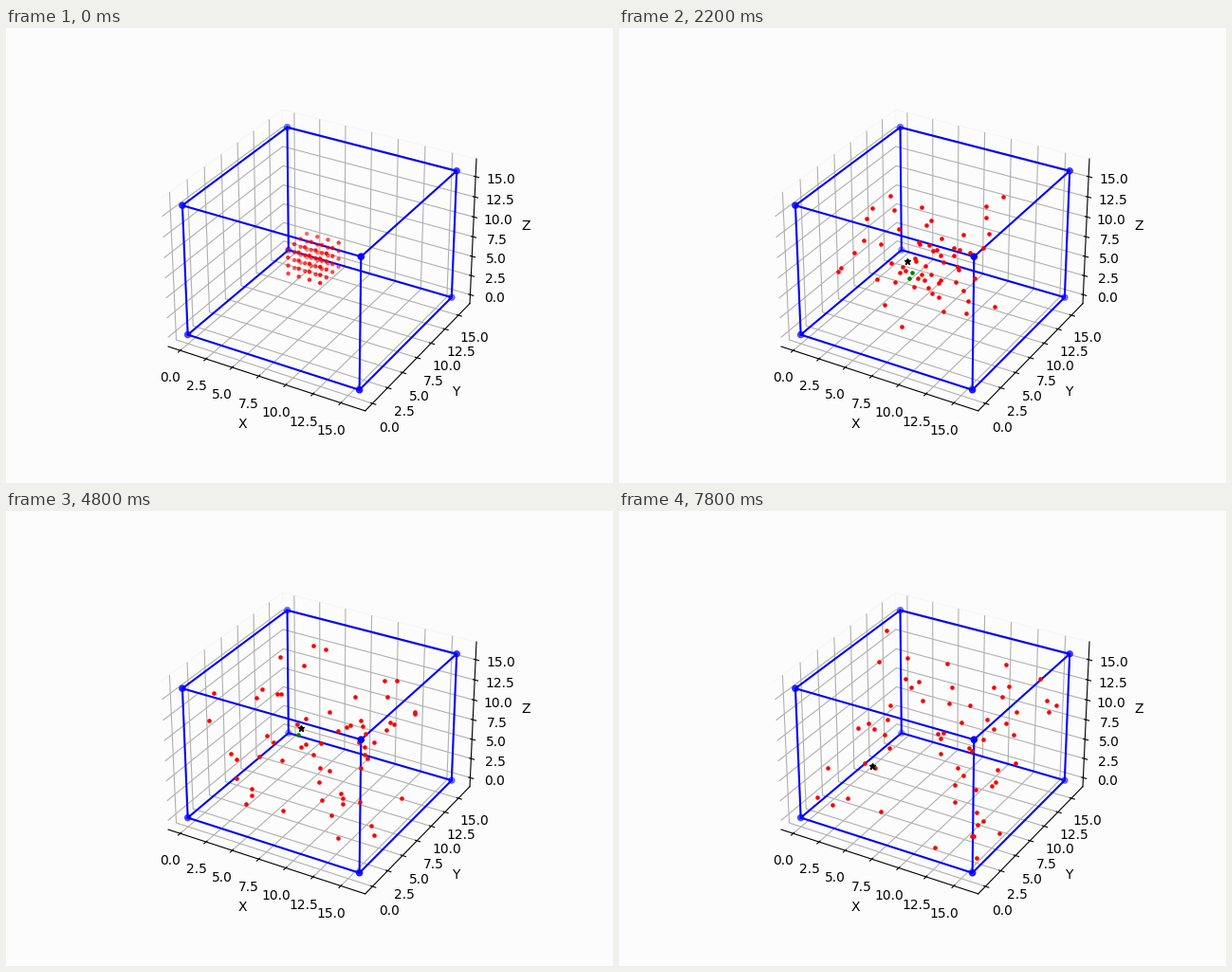
Recreate the animation shown at these times as a matplotlib script. Size 640 px wide and 480 px high, loop 8 s.

```python
from itertools import combinations, product

import numpy as np
import matplotlib.pyplot as plt
from matplotlib.animation import FuncAnimation

SIDE = 16
FRAMES, INTERVAL = 40, 200
REACH = 2.3           # neighbours closer than this turn green
CROWD = 3             # with this many neighbours the star turns red
PAPER = "#fcfcfc"

fig = plt.figure(figsize=(6.4, 4.8), dpi=100, facecolor=PAPER)
ax = fig.add_subplot(projection="3d")
ax.set_facecolor(PAPER)
for axis, name in zip((ax.xaxis, ax.yaxis, ax.zaxis), "XYZ"):
    axis.pane.set_facecolor(PAPER)
    axis.pane.set_edgecolor("#f2f2f2")
    axis.set_label_text(name)

# container
corners = np.array(list(product((0, SIDE), repeat=3)))
for a, b in combinations(corners, 2):
    if np.count_nonzero(a != b) == 1:
        ax.plot(*zip(a, b), color="blue")
ax.scatter(*corners.T, color="blue")

# 4 x 4 x 4 lattice; the first particle becomes the star
start = np.array(list(product(range(6, 10), repeat=3)), float)
speed = np.random.default_rng(11).normal(0, 0.3, start.shape)

# the star drifts up, is struck once and flies back down
HIT_STEP = 24.7
HIT = np.array([7.3, 6, 10.1])
DRIFT = (HIT - start[0]) / HIT_STEP
RECOIL = np.array([-0.284, 0, -0.444])


def gas(step):
    """Free flight, folded back at the walls."""
    pos = (start + speed * step)[1:] % (2 * SIDE)
    return np.where(pos > SIDE, 2 * SIDE - pos, pos)


def star_at(step):
    t = step - HIT_STEP
    return HIT + t * (DRIFT if t < 0 else RECOIL)


def dots(color):
    return ax.plot(*start.T, "o", color=color, ms=3.3, mew=0)[0]


lattice = ax.scatter(*start.T, s=5, color="red")
far, near = dots("red"), dots("green")
star, = ax.plot(*start[:1].T, "*", color="black", ms=5, mew=1)


def draw(step):
    moving = step > 0
    lattice.set_visible(not moving)
    for artist in (far, near, star):
        artist.set_visible(moving)
    pos, centre = gas(step), star_at(step)
    close = np.linalg.norm(pos - centre, axis=1) < REACH
    far.set_data_3d(*pos[~close].T)
    near.set_data_3d(*pos[close].T)
    star.set_data_3d(*centre[:, None])
    star.set_markerfacecolor("red" if close.sum() >= CROWD else "black")
    return lattice, far, near, star


anim = FuncAnimation(fig, draw, frames=FRAMES, interval=INTERVAL,
                     repeat=True, repeat_delay=0)
plt.show()
```
